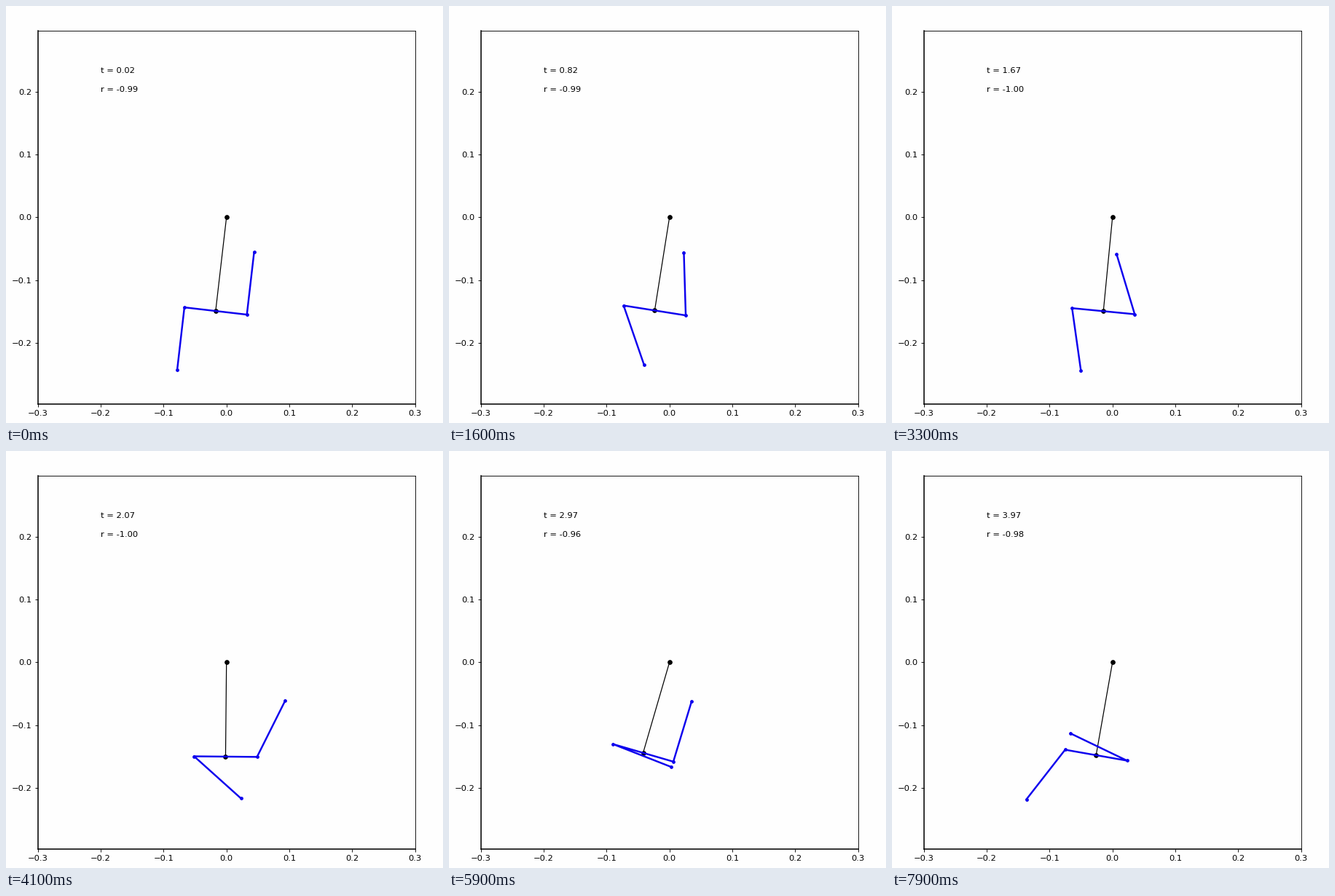
A matplotlib script for the animation above (8000 ms loop, 600 by 573 pixels).

```python
import numpy as np
import matplotlib.pyplot as plt
from matplotlib.animation import FuncAnimation

W, H, DPI = 600, 573, 80
FRAMES, STEP = 80, 100
ROD, HALF, LIMB = 0.15, 0.05, 0.1
BACK, BLUE = "#fefefe", "#0d00ee"

# Key points: time, swing phase in degrees, hand reach, foot lean
KEYS = np.array([
    (0.02, -161, 0, 0),
    (0.52, 81, 0.18, 0.08),
    (1.12, 346.8, 0.21, 0.14),
    (1.67, 608.4, 0.41, 0.32),
    (2.47, 1015.3, 0.81, 0.04),
    (3.47, 1423.6, 1.58, 0.03),
    (3.97, 1687.6, 1.36, -0.42),
]).T


def cosd(degrees):
    return np.cos(np.radians(degrees))


def down(angle):
    return np.array([np.sin(angle), -np.cos(angle)])


def pose(t):
    """Absolute angles of rod, hand limb and foot limb: a growing swing."""
    phase, reach, lean = (np.interp(t, KEYS[0], row) for row in KEYS[1:])
    theta = (0.12 + 0.085 * t) * cosd(phase)
    hand = -reach * cosd(phase - 50)
    kick = 1.5 * (1 - np.exp(-t * t))
    foot = lean - kick * cosd(phase + 25)
    return theta, theta + hand, theta + foot


plt.rcParams.update({"font.family": "DejaVu Sans", "font.size": 10.3})
fig = plt.figure(figsize=(W / DPI, H / DPI), dpi=DPI, facecolor=BACK)
width, height = 518.2, 513.6
ax = fig.add_axes([43.6 / W, 25.8 / H, width / W, height / H], facecolor=BACK)
ylim = 0.3 * height / width
ax.set(xlim=(-0.3, 0.3), ylim=(-ylim, ylim),
       xticks=np.arange(-3, 4) / 10, yticks=np.arange(-2, 3) / 10)
for side in ("left", "bottom"):
    ax.spines[side].set_linewidth(1.4)

rod, = ax.plot([], [], "o-", color="black", lw=1.1, ms=5)
body, = ax.plot([], [], "o-", color=BLUE, lw=2.2, ms=3.3)
time_text = ax.text(-0.2, 0.23, "")
reward_text = ax.text(-0.2, 0.2, "")


def update(i):
    t = 0.02 + 0.05 * i
    theta, upper, lower = pose(t)
    hip = ROD * down(theta)
    across = HALF * np.array([np.cos(theta), np.sin(theta)])
    right, left = hip + across, hip - across
    hand = right - LIMB * down(upper)
    foot = left + LIMB * down(lower)

    rod.set_data([0, hip[0]], [0, hip[1]])
    body.set_data(*np.array([foot, left, right, hand]).T)
    time_text.set_text(f"t = {t:.2f}")
    reward_text.set_text(f"r = {-np.cos(theta):.2f}")
    return rod, body, time_text, reward_text


anim = FuncAnimation(fig, update, frames=FRAMES, interval=STEP,
                     repeat=True, repeat_delay=0, blit=False)
plt.show()
```
